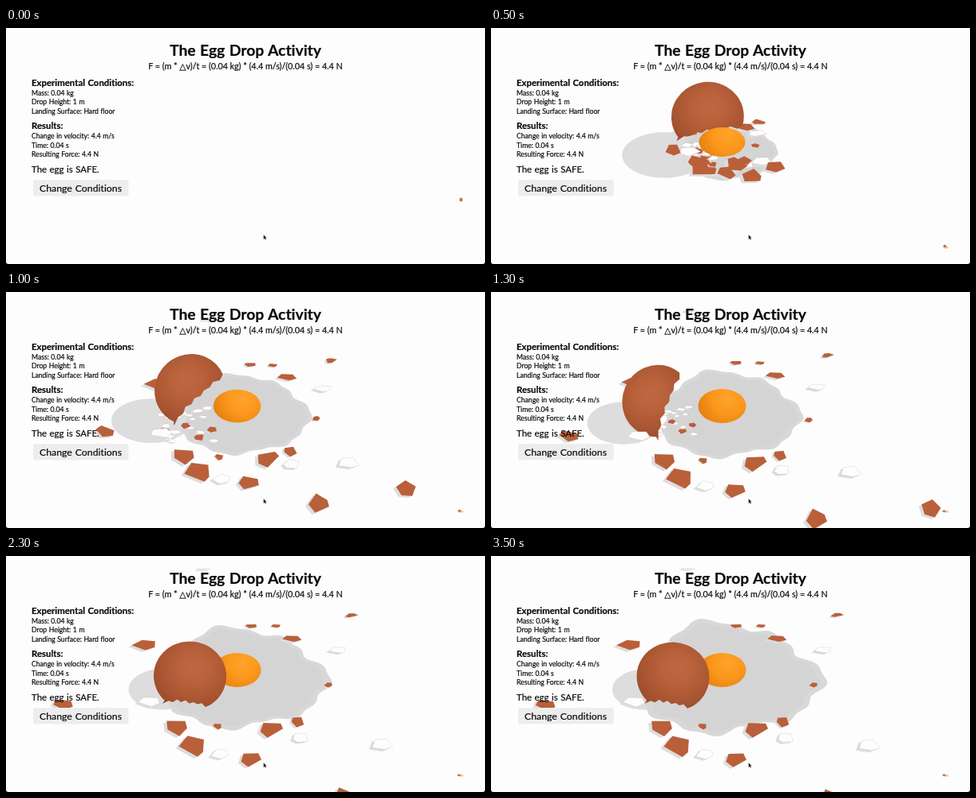
Animation of 600x297 px, one loop 3.6 s. Source, as an HTML page with a canvas:

```html
<!DOCTYPE html>
<html lang="en">
<head>
<meta charset="utf-8">
<title>The Egg Drop Activity</title>
<style>
  html, body { margin: 0; width: 100%; height: 100%; overflow: hidden; background: #fdfdfd; }
  canvas, svg { position: absolute; left: 0; top: 0; width: 600px; height: 297px; }
  text {
    font-family: Lato, "Open Sans", "DejaVu Sans", sans-serif;
    font-variant-ligatures: none;
    fill: #0b0b0b; stroke: #0b0b0b; stroke-width: .2px;
  }
  .title { font-size: 19.3px; font-weight: 700; text-anchor: middle; word-spacing: .04em; }
  .formula { font-size: 10.7px; text-anchor: middle; }
  .head { font-size: 11.4px; font-weight: 700; word-spacing: .06em; }
  .row { font-size: 8.65px; word-spacing: .04em; }
  .note { font-size: 11.4px; word-spacing: .06em; }
  .button { font-size: 12.3px; text-anchor: middle; word-spacing: .06em; }
</style>
</head>
<body>
<canvas id="scene" width="600" height="297"></canvas>
<svg viewBox="0 0 600 297">
  <rect x="34" y="191" width="119.5" height="20.5" rx="2" fill="#ededed"/>
  <text class="title" x="300" y="35">The Egg Drop Activity</text>
  <text class="formula" x="300" y="52">F = (m * △v)/t = (0.04 kg) * (4.4 m/s)/(0.04 s) = 4.4 N</text>
  <text class="head" x="32" y="72.5">Experimental Conditions:</text>
  <text class="row" x="32" y="84.5">Mass: 0.04 kg</text>
  <text class="row" x="32" y="96">Drop Height: 1 m</text>
  <text class="row" x="32" y="107.5">Landing Surface: Hard floor</text>
  <text class="head" x="32" y="127">Results:</text>
  <text class="row" x="32" y="139">Change in velocity: 4.4 m/s</text>
  <text class="row" x="32" y="150.7">Time: 0.04 s</text>
  <text class="row" x="32" y="162.2">Resulting Force: 4.4 N</text>
  <text class="note" x="32" y="182">The egg is SAFE.</text>
  <text class="button" x="93.5" y="205.5">Change Conditions</text>
  <path d="M322.5 260v6.2l1.5-1.3 1 2.2 1-.4-1-2.2h1.9z" fill="#000" stroke="#fff" stroke-width=".4"/>
  <path d="M0 294v3h3q-3 0-3-3zM600 294v3h-3q3 0 3-3z" fill="#000"/>
</svg>
<script>
const ctx = document.getElementById('scene').getContext('2d');
const LOOP = 3600, STEP = 100, IMPACT = 350;
const PAPER = '#fdfdfd', BROWN = '#b9603b', SHADOW = '#dddddd';
const TAU = Math.PI * 2;
const CENTER = { x: 288, y: 140 };

// Half shell rolling over: time, x, y, degrees, height of the broken rim.
const ROLL = [
  [350, 285, 114, -5, .5],
  [700, 253, 108, -18, .35],
  [1300, 208, 137, -70, .33],
  [1800, 233, 150, 4, .78],
  [2800, 228, 152, 8, .78]
];

// Where the larger shards come to rest: x, y, size.
const BROWN_RESTS = [
  [173, 112, 16], [308, 88, 7], [338, 88, 6], [358, 104, 11], [433, 74, 8], [404, 162, 5],
  [366, 209, 9], [332, 217, 14], [214, 215, 14], [235, 240, 16], [308, 256, 12], [265, 214, 5],
  [67, 187, 12], [424, 308, 13], [650, 320, 12]
];
const PALE_RESTS = [[474, 238, 13], [369, 229, 11], [268, 249, 11], [178, 183, 13], [416, 118, 12], [246, 16, 9]];

const mix = (a, b, k) => a + (b - a) * k;
const clamp = v => Math.max(0, Math.min(1, v));
const rnd = n => { const v = Math.sin(n * 127.1 + 3.7) * 43758.5453; return v - Math.floor(v); };
const dropHeight = t => 60 - 544 * (t / 1000) ** 2;

function oval(x, y, rx, ry, fill) {
  ctx.fillStyle = fill;
  ctx.beginPath();
  ctx.ellipse(x, y, rx, ry, 0, 0, TAU);
  ctx.fill();
}

function glow(x, y, r, ...colors) {
  const g = ctx.createRadialGradient(x, y, 0, x, y, r);
  colors.forEach((c, i) => g.addColorStop(i / (colors.length - 1), c));
  return g;
}

function fallingEgg() {
  ctx.save();
  ctx.filter = 'blur(2px)';
  ctx.fillStyle = glow(308, 92, 100, '#c96b3f', '#bd6036', '#a4502c', '#964827');
  ctx.beginPath();
  ctx.moveTo(289, 50);
  ctx.bezierCurveTo(320, 50, 342, 80, 342, 113);
  ctx.bezierCurveTo(342, 148, 314, 182, 291, 182);
  ctx.bezierCurveTo(266, 182, 237, 148, 237, 113);
  ctx.bezierCurveTo(237, 80, 258, 50, 289, 50);
  ctx.fill();
  ctx.restore();
}

// A puddle that spreads quickly, then ever more slowly, with growing lobes.
function eggWhite(t) {
  const spread = 70 * ((t - IMPACT) / 350) ** .206;
  const lobes = spread / 1000;
  const puddle = (scale, fill) => {
    ctx.beginPath();
    for (let a = 0; a < TAU; a += .03) {
      const wave = Math.sin(3 * a + 1) * .7 + Math.sin(7 * a + 2) * .5 + Math.sin(16 * a) * .25;
      const r = spread * scale * (1 + lobes * wave);
      ctx.lineTo(297 + r * Math.cos(a), 155 + r * .62 * Math.sin(a));
    }
    ctx.fillStyle = fill;
    ctx.fill();
  };
  puddle(1, '#d8d8d8');
  puddle(.93, '#d4d4d4');
}

function yolk(t) {
  const swell = clamp((t - 700) / 400);
  oval(289.5, 143.5, mix(29, 30, swell), mix(18.5, 21.5, swell),
    glow(297, 134, 40, '#ffa42c', '#fb971b', '#e27f10'));
}

function rollAt(t) {
  let i = 0;
  while (i < ROLL.length - 2 && t > ROLL[i + 1][0]) i++;
  const [a, b] = [ROLL[i], ROLL[i + 1]];
  const k = clamp((t - a[0]) / (b[0] - a[0]));
  return a.map((v, j) => mix(v, b[j], k)).slice(1);
}

// The shadow slides out to the lower left the higher the shell stands.
function shellShadow(t) {
  const [x, y] = rollAt(t), lift = (172 - y) * .8;
  oval(x - 25 - lift * .6, y + lift, 36 + lift * .35, 24 + lift * .1, SHADOW);
}

function shell(t) {
  const [x, y, deg, cut] = rollAt(t);
  const start = Math.asin(cut), half = Math.cos(start), teeth = 11;
  ctx.save();
  ctx.translate(x, y);
  ctx.rotate(deg * Math.PI / 180);
  ctx.scale(45.5, 43.5);
  ctx.beginPath();
  ctx.arc(0, 0, 1, Math.PI - start, start);
  for (let i = 1; i < teeth; i++) {
    const jag = (i % 2 ? 1 : -1) * rnd(i + 40) * .08;
    ctx.lineTo(mix(half, -half, i / teeth), cut + jag);
  }
  ctx.lineTo(-half * 1.08, cut + .1);
  ctx.closePath();
  ctx.fillStyle = glow(.1, -.25, 1.25, '#bf6740', '#b9623c', '#ad5834', '#9c4d2c');
  ctx.fill();
  ctx.restore();
}

// An irregular chip; chips farther up the stage look flatter.
function chip(x, y, size, turn, seed, pale) {
  const flat = (.1 + y / 330) * (pale ? .7 : 1);
  const trace = (dx, dy) => {
    ctx.beginPath();
    for (let i = 0; i < 5; i++) {
      const a = (i + rnd(seed * 9 + i) * .6) * TAU / 5 + turn;
      const r = size * (.9 + rnd(seed * 5 + i) * .3);
      ctx.lineTo(x + dx + Math.cos(a) * r, y + dy + Math.sin(a) * r * flat);
    }
    ctx.closePath();
  };
  const drop = Math.min(4, size * .3);
  trace(-drop, drop * .6);
  ctx.fillStyle = SHADOW;
  ctx.fill();
  trace(0, 0);
  ctx.fillStyle = pale ? PAPER : BROWN;
  ctx.fill();
  if (pale) {
    ctx.strokeStyle = 'rgba(150,100,80,.3)';
    ctx.lineWidth = .5;
    ctx.stroke();
  }
}

// Shards fly out from the centre and slow down; long throws take longer.
function thrown([x, y, size], seed, t, pale) {
  const reach = Math.hypot(x - CENTER.x, y - CENTER.y);
  const p = 1 - Math.exp((IMPACT - t) / (160 + 1.4 * reach));
  const turn = (1 - p) * (rnd(seed) - .5) * 6;
  chip(mix(CENTER.x, x, p), mix(CENTER.y, y, p), size, turn, seed, pale);
}

function shards(t, front) {
  const throwAll = (rests, base, pale) => rests.forEach((rest, i) => {
    if (rest[1] > 150 === front) thrown(rest, base + i, t, pale);
  });
  throwAll(PALE_RESTS, 30, true);
  throwAll(BROWN_RESTS, 1, false);
}

// Small bits that the shell finally covers.
function crumbs(t) {
  const p = clamp((t - 700) / 1100), out = clamp((t - IMPACT) / 350);
  for (let i = 0; i < 24; i++) {
    const u = rnd(i + 200), v = rnd(i + 300);
    const x = mix(186 + u * 84, 212 + u * 34, p), y = mix(146 + v * 52, 142 + v * 24, p);
    const size = mix(4 + rnd(i + 400) * 5, 3, p);
    chip(mix(CENTER.x, x, out), mix(CENTER.y, y, out), size, p * 3 + i, i + 60, i % 6 > 0);
  }
}

function smallView(t) {
  if (t < IMPACT) {
    oval(570, 276 - dropHeight(t), 2, 2.5, '#c0714f');
    return;
  }
  const settled = clamp((t - 700) / 600);
  oval(569.5, 276.3, 4, 1.6, '#e4e2e1');
  oval(mix(568.5, 567.5, settled), mix(274.5, 275.8, settled), 2, mix(1.8, 1.2, settled), '#bf7353');
  oval(570.5, 276.3, 1.3, .9, '#f2a850');
}

function brokenEgg(t) {
  shellShadow(t);
  eggWhite(t);
  shards(t, false);
  crumbs(t);
  const parts = t < 1000 ? [shell, yolk] : [yolk, shell];
  parts.forEach(part => part(t));
  shards(t, true);
}

function draw(t) {
  ctx.fillStyle = PAPER;
  ctx.fillRect(0, 0, 600, 297);
  smallView(t);
  if (t >= IMPACT) {
    brokenEgg(t);
    return;
  }
  if (t >= 200) oval(290 - 5.3 * dropHeight(t), 155, 67, 33, SHADOW);
  if (t >= 300) fallingEgg();
}

const origin = performance.now();
function tick() {
  const t = (performance.now() - origin) % LOOP;
  draw(Math.floor(t / STEP) * STEP);
  requestAnimationFrame(tick);
}
tick();
</script>
</body>
</html>
```
